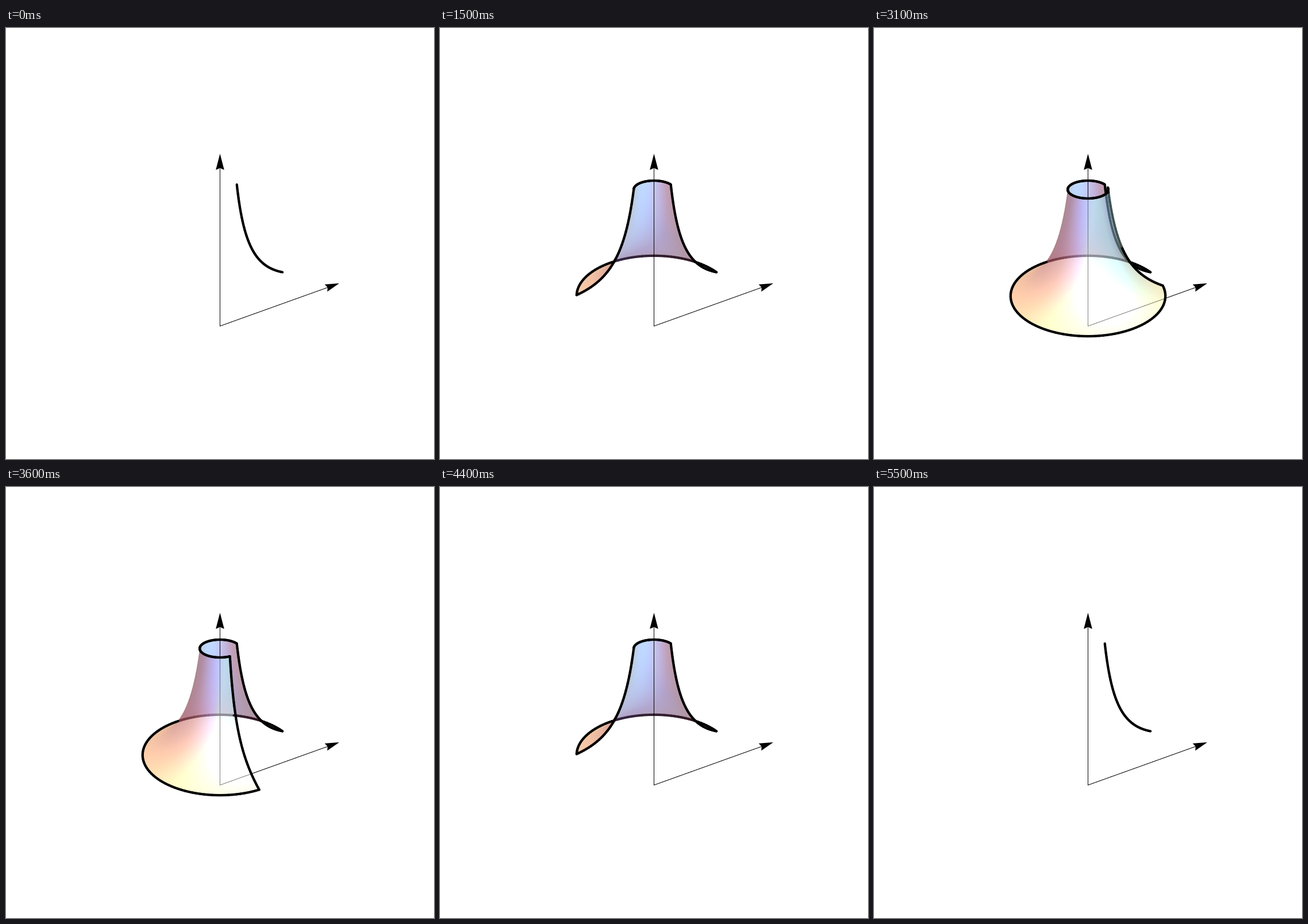
A matplotlib script for the animation above (6000 ms loop, 745 by 751 pixels).

```python
import numpy as np
import matplotlib.pyplot as plt
from matplotlib.animation import FuncAnimation
from matplotlib.collections import LineCollection
from matplotlib.patches import Polygon

W, H, DPI = 745, 751, 100
FRAMES, INTERVAL = 60, 100
LAST_STEP = 25

# Camera: u points right, v away from the viewer, z up
DIST, FOCAL, MID = 14.35, 1978.0, 1.24
TILT = np.radians(28.74)
S, C = np.sin(TILT), np.cos(TILT)
RIGHT = np.array([1.0, 0.0, 0.0])
UP = np.array([0.0, S, C])
FORWARD = np.array([0.0, C, -S])
EYE = np.array([0.0, 0.0, MID]) - DIST * FORWARD

# Surface z = 1 / (2r), swept from the azimuth START
R_IN, R_OUT = 0.25, 1.0
START = np.radians(33.4)
OPACITY, SHININESS = 0.5, 8
Z_LEN, R_LEN = 2.48, 2.0

AMBIENT = np.array([0.4, 0.2, 0.2])
LIGHTS = [  # colour, direction in screen space (right, up, towards viewer)
    ((0.0, 0.18, 0.5), (1.5, -0.5, 1.5)),
    ((0.18, 0.5, 0.18), (1.5, 1.5, 2.5)),
    ((0.5, 0.18, 0.0), (-0.5, 1.5, 1.5)),
    ((0.0, 0.0, 0.18), (-0.5, -0.5, 1.5)),
]

# Part of the stage that the surface can cover
X0, X1, Y0, Y1 = 230, 520, 255, 545
SUPER = 2
REACH, STEPS = 2.8, 64


def depth(p):
    return (p - EYE) @ FORWARD


def project(p):
    d = p - EYE
    scale = FOCAL / (d @ FORWARD)
    return np.stack([W / 2 + d @ RIGHT * scale, H / 2 - d @ UP * scale], axis=-1)


def field(p):
    return 2 * p[:, 2] * np.hypot(p[:, 0], p[:, 1]) - 1


def unit(v):
    v = np.asarray(v, dtype=float)
    return v / np.linalg.norm(v)


def lit_colour(p):
    r = np.hypot(p[:, 0], p[:, 1])
    n = np.stack([0.5 * p[:, 0] / r**3, 0.5 * p[:, 1] / r**3, np.ones_like(r)], axis=1)
    n /= np.linalg.norm(n, axis=1, keepdims=True)
    n[np.sum(n * (EYE - p), axis=1) < 0] *= -1
    screen = np.stack([n @ RIGHT, n @ UP, -(n @ FORWARD)], axis=1)
    rgb = np.tile(AMBIENT, (len(p), 1))
    for colour, direction in LIGHTS:
        to_light = unit(direction)
        halfway = unit(to_light + [0, 0, 1])
        diffuse = np.clip(screen @ to_light, 0, None)
        gloss = np.clip(screen @ halfway, 0, None) ** SHININESS
        rgb += np.outer(diffuse + gloss * (diffuse > 0), colour)
    return np.clip(rgb, 0, 1)


def cast(points):
    """March from points to the eye; list surface hits from far to near."""
    step = -(points - EYE) / depth(points)[:, None] * (REACH / STEPS)
    here, g_here = points, field(points)
    hits = []
    for _ in range(STEPS):
        ahead = here + step
        g_ahead = field(ahead)
        idx = np.flatnonzero((g_here > 0) != (g_ahead > 0))
        if len(idx):
            lo, hi = here[idx], ahead[idx]
            side = g_here[idx] > 0
            for _ in range(7):
                mid = (lo + hi) / 2
                same = ((field(mid) > 0) == side)[:, None]
                lo, hi = np.where(same, mid, lo), np.where(same, hi, mid)
            p = (lo + hi) / 2
            r = np.hypot(p[:, 0], p[:, 1])
            keep = (r >= R_IN) & (r <= R_OUT)
            if keep.any():
                p = p[keep]
                turn = (np.arctan2(p[:, 1], p[:, 0]) - START) % (2 * np.pi)
                hits.append((idx[keep], turn, lit_colour(p)))
        here, g_here = ahead, g_ahead
    return hits


def overlay(base, hits, sweep):
    for idx, turn, rgb in hits:
        on = turn <= sweep
        cells = idx[on]
        base[cells] = (1 - OPACITY) * base[cells] + OPACITY * rgb[on]
    return base


def pixel_hits():
    xs = np.arange(X0, X1, 1 / SUPER) + 0.5 / SUPER
    ys = np.arange(Y0, Y1, 1 / SUPER) + 0.5 / SUPER
    gx, gy = np.meshgrid((xs - W / 2) / FOCAL, (H / 2 - ys) / FOCAL)
    rays = np.outer(gx.ravel(), RIGHT) + np.outer(gy.ravel(), UP) + FORWARD
    return cast(EYE + (DIST + REACH / 2) * rays)


def surface_image(sweep):
    rows, cols = Y1 - Y0, X1 - X0
    rgb = overlay(np.ones((rows * cols * SUPER**2, 3)), HITS, sweep)
    return rgb.reshape(rows, SUPER, cols, SUPER, 3).mean(axis=(1, 3))


def polar(r, angle, z):
    r, angle, z = np.broadcast_arrays(r, angle, z)
    return np.stack([r * np.cos(angle), r * np.sin(angle), z], axis=-1)


def profile(turn):
    r = np.geomspace(R_IN, R_OUT, 41)
    return polar(r, START + turn, 0.5 / r)


def ring(r, sweep):
    count = int(np.ceil(sweep / 0.05)) + 1
    return polar(r, START + np.linspace(0, sweep, count), 0.5 / r)


def line_set(sweep):
    thin, thick = 1.0, 4.2
    along = np.linspace(0, 0.92, 41)
    paths = [
        (polar(0.0, 0.0, Z_LEN * along), thin),
        (polar(R_LEN * along, START, 0.0), thin),
        (profile(0), thick),
    ]
    if sweep > 0:
        paths += [(profile(sweep), thick),
                  (ring(R_IN, sweep), thick), (ring(R_OUT, sweep), thick)]
    ends = np.concatenate([np.stack([p[:-1], p[1:]], axis=1) for p, _ in paths])
    widths = np.concatenate([np.full(len(p) - 1, w) for p, w in paths])
    order = np.argsort(-depth(ends.mean(axis=1)))
    return ends[order], widths[order]


def arrow_head(tip, direction, length, half, notch):
    d = unit(direction)
    side = np.array([-d[1], d[0]]) * half
    base = tip - length * d
    return Polygon([tip, base + side, base + notch * d, base - side],
                   closed=True, facecolor="black", linewidth=0, zorder=3)


def sweep_at(step):
    return 0.05 + 0.2545 * (step - 1) if step > 0 else 0.0


def draw(i):
    step = int(np.clip(min(i - 4, FRAMES - 5 - i), 0, LAST_STEP))
    sweep = sweep_at(step)
    picture.set_data(surface_image(sweep))

    ends, widths = line_set(sweep)
    middle = ends.mean(axis=1)
    # Lift lines off the surface so that they do not hide behind themselves
    lifted = middle + 0.03 * (EYE - middle) / DIST
    colours = overlay(np.zeros((len(ends), 3)), cast(lifted), sweep)
    lines.set_segments(project(ends))
    lines.set_linewidths(widths * 72 / DPI)
    lines.set_color(colours)
    return picture, lines


HITS = pixel_hits()

fig = plt.figure(figsize=(W / DPI, H / DPI), dpi=DPI, facecolor="white")
ax = fig.add_axes([0, 0, 1, 1])
picture = ax.imshow(np.ones((Y1 - Y0, X1 - X0, 3)), extent=(X0, X1, Y1, Y0),
                    interpolation="nearest", aspect="auto", zorder=1)
lines = LineCollection([], capstyle="round", zorder=2)
lines.set_snap(False)
ax.add_collection(lines)

origin, z_tip, r_tip = project(np.array(
    [[0, 0, 0], [0, 0, Z_LEN], [R_LEN * np.cos(START), R_LEN * np.sin(START), 0]]))
ax.add_patch(arrow_head(z_tip, z_tip - origin, 28, 7.3, 3))
ax.add_patch(arrow_head(r_tip, r_tip - origin, 24.5, 6.7, 3))
ax.set_xlim(0, W)
ax.set_ylim(H, 0)
ax.axis("off")

anim = FuncAnimation(fig, draw, frames=FRAMES, interval=INTERVAL,
                     repeat=True, repeat_delay=0, blit=False)
plt.show()
```
